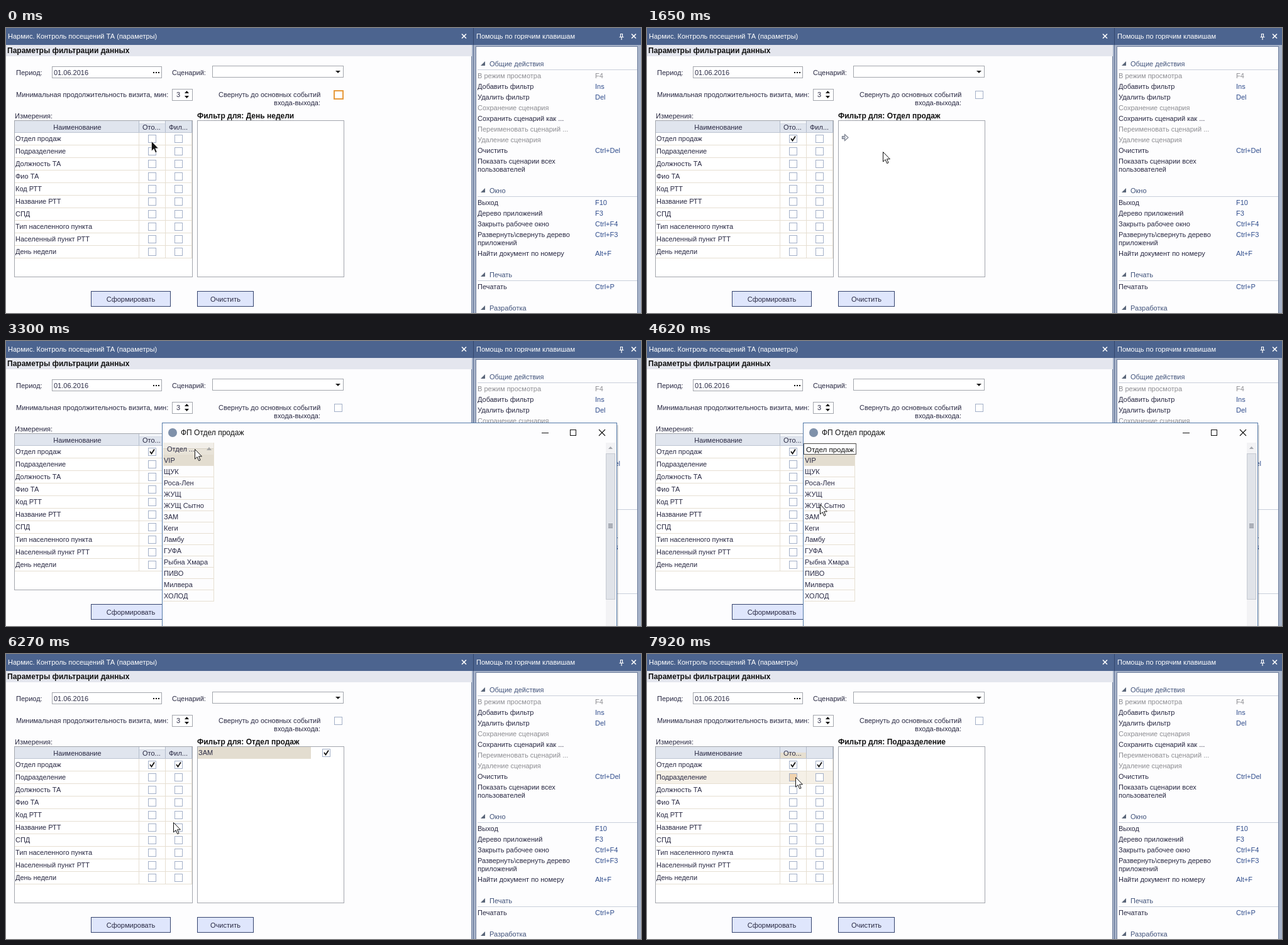
Recreate the animation shown at these times as an HTML page. Size 1010 by 454 pixels, loop 8 s.

```html
<!DOCTYPE html>
<html lang="ru">
<head>
<meta charset="utf-8">
<style>
html, body { margin: 0; width: 100%; height: 100%; overflow: hidden; background: #fdfdfe; }
svg { display: block; width: 100vw; height: 100vh; font: 11px "Liberation Sans", Arial, sans-serif; }
rect { shape-rendering: crispEdges; }
text { white-space: pre; }
</style>
</head>
<body>
<svg id="stage" viewBox="0 0 1010 454"></svg>
<script>
const LOOP = 8000, STEP = 330;
const INK = '#292943', BLUE = '#2f4c8c', DIM = '#8d8d92', BAR = '#4c648f';
const TAN = '#e3ddd0', GRID = '#e6dfd2', EDGE = '#a3a6ad', BOX = '#a3b0c8';

const rows = ['Отдел продаж', 'Подразделение', 'Должность ТА', 'Фио ТА', 'Код РТТ', 'Название РТТ',
  'СПД', 'Тип населенного пункта', 'Населенный пункт РТТ', 'День недели'];
const depts = ['VIP', 'ЩУК', 'Роса-Лен', 'ЖУЩ', 'ЖУЩ Сытно', 'ЗАМ', 'Кеги', 'Ламбу', 'ГУФА',
  'Рыбна Хмара', 'ПИВО', 'Милвера', 'ХОЛОД'];
// baseline, label, key, disabled
const help = [
  [80, 'В режим просмотра', 'F4', 1], [97, 'Добавить фильтр', 'Ins'], [114, 'Удалить фильтр', 'Del'],
  [131, 'Сохранение сценария', '', 1], [148, 'Сохранить сценарий как ...', ''],
  [165, 'Переименовать сценарий ...', '', 1], [182, 'Удаление сценария', '', 1],
  [199, 'Очистить', 'Ctrl+Del'], [216, 'Показать сценарии всех', ''], [229, 'пользователей', ''],
  [282, 'Выход', 'F10'], [299, 'Дерево приложений', 'F3'], [316, 'Закрыть рабочее окно', 'Ctrl+F4'],
  [333, 'Развернуть\\свернуть дерево', 'Ctrl+F3'], [346, 'приложений', ''],
  [363, 'Найти документ по номеру', 'Alt+F'], [416, 'Печатать', 'Ctrl+P']];
const groups = [[61, 'Общие действия'], [263, 'Окно'], [397, 'Печать'], [450, 'Разработка']];

// first step, x, y of the pointer
const moves = [[0, 231, 180], [1, 240, 191], [3, 324, 215], [4, 371, 228], [5, 375, 197],
  [9, 330, 180], [10, 300, 172], [11, 286, 174], [12, 280, 234], [13, 275, 258], [14, 275, 260],
  [15, 282, 252], [16, 272, 280], [17, 271, 283], [18, 272, 281], [19, 266, 268],
  [20, 246, 240], [21, 236, 222], [22, 236, 196]];
const clicks = [1, 4, 18];

const rect = (x, y, w, h, fill) => `<rect x="${x}" y="${y}" width="${w}" height="${h}" fill="${fill}"/>`;
const frame = (x, y, w, h, edge, fill = '#fff') => rect(x, y, w, h, edge) + rect(x + 1, y + 1, w - 2, h - 2, fill);
const text = (x, y, s, fill = INK, more = '') => `<text x="${x}" y="${y}" fill="${fill}" ${more}>${s}</text>`;
const mid = (x, y, s) => text(x, y, s, INK, 'text-anchor="middle"');
const bold = (x, y, s) => text(x, y, s, '#111', 'font-size="12" font-weight="700"');
const shape = (d, fill) => `<path d="${d}" fill="${fill}"/>`;
const line = (d, color, w = 1) => `<path d="${d}" fill="none" stroke="${color}" stroke-width="${w}"/>`;
const cross = (x, y, r, color, w) => line(`M${x - r} ${y - r}l${2 * r} ${2 * r}m0 ${-2 * r}l${-2 * r} ${2 * r}`, color, w);
const check = (x, y, on, fill = '#fff') => frame(x, y, 13, 13, BOX, fill) +
  (on ? line(`M${x + 3} ${y + 6}l2.5 3.5l4.5 -7`, '#111', 1.8) : '');

function titles() {
  return rect(0, 0, 743, 27, BAR) + text(3, 17, 'Нармис. Контроль посещений ТА (параметры)', '#fff') +
    cross(728.5, 13, 3.5, '#fff', 1.6) +
    rect(0, 27, 741, 18, '#e4e6ee') + bold(2, 40, 'Параметры фильтрации данных');
}

function sidebar() {
  let s = rect(740, 27, 270, 427, '#a7b3c9') + rect(740, 27, 1, 427, '#74839f') +
    rect(743, 0, 1, 454, '#5b6d90') + rect(744, 0, 266, 27, BAR) + rect(742, 0, 2, 27, '#33466c') +
    frame(747, 29, 258, 430, '#6b7b9a', '#fdfdfe') +
    text(748, 17, 'Помощь по горячим клавишам', '#fff') + cross(998.5, 13, 3.5, '#fff', 1.6) +
    line('M977.5 9v5M980.5 9v5M977 9.5h4M975.5 14.5h7M979 15v4', '#fff', 1.2);
  for (const [y, name] of groups)
    s += shape(`M755 ${y - 1}h7v-7z`, '#5a6679') + text(769, y, name, '#40527a') +
      rect(750, y + 5, 254, 1, '#c9cfdb');
  for (const [y, name, key, off] of help)
    s += text(750, y, name, off ? DIM : INK) + text(937, y, key, off ? DIM : BLUE);
  return s;
}

function fields(k) {
  return text(16, 75, 'Период:') + frame(73, 61, 175, 19, EDGE) + text(76, 75, '01.06.2016') +
    [234, 238, 242].map(x => rect(x, 70, 2, 2, '#111')).join('') +
    text(264, 75, 'Сценарий:') + frame(328, 60, 209, 19, EDGE) + shape('M524 68h8l-4 4z', '#222') +
    text(16, 110, 'Минимальная продолжительность визита, мин:') + frame(264, 97, 33, 19, EDGE) +
    text(271, 110, '3') + shape('M284 104h7l-3.5 -4zM284 108h7l-3.5 4z', '#111') +
    text(338, 110, 'Свернуть до основных событий') +
    text(500, 123, 'входа-выхода:', INK, 'text-anchor="end"') +
    (k < 2 ? rect(521, 99, 16, 15, '#e79a3c') + rect(523, 101, 12, 11, '#fff') : check(522, 100)) +
    text(14, 144, 'Измерения:');
}

function table(k) {
  const last = k > 23;
  let s = frame(13, 147, 284, 250, EDGE) + rect(14, 148, 282, 18, '#e0e5ee') + rect(14, 166, 282, 1, '#bcc4d2');
  s += last ? rect(212, 157, 41, 9, '#e6dfd0') : rect(212, 148, 41, 4, '#f3f5f9') + rect(212, 152, 41, 1, '#d3d8e2');
  s += mid(113.5, 162, 'Наименование') + text(217, 162, 'Ото...') + (last ? '' : text(259, 162, 'Фил...'));
  if (last) s += rect(14, 187, 281, 19, '#f5f0e7');
  rows.forEach((name, i) => {
    const y = 167 + i * 20;
    s += rect(14, y + 19, 282, 1, GRID) + text(15, y + 13, name) +
      check(226, y + 3, !i && k > 1, last && i == 1 ? '#f0d3ae' : '#fff') +
      check(268, y + 3, !i && k > 18);
  });
  for (const x of [211, 253, 295]) s += rect(x, 148, 1, 18, '#b4bdcc') + rect(x, 167, 1, 200, GRID);
  return s;
}

function filter(k) {
  const name = rows[k < 2 ? 9 : k < 24 ? 0 : 1];
  let s = bold(304, 144, 'Фильтр для: ' + name) + frame(304, 147, 234, 250, EDGE);
  if (k >= 5 && k < 19) s += line('M310.5 172.5h4v-3l5.5 5l-5.5 5v-3h-4z', '#777d8b', 1.2) + rect(311, 173, 5, 3, '#b5bac6');
  if (k > 18 && k < 24) s += rect(305, 148, 180, 19, TAN) + text(306, 161, 'ЗАМ') + check(503, 151, 1);
  return s;
}

function buttons() {
  return frame(135, 419, 127, 25, '#35446f', '#dfe6fc') + mid(198.5, 436, 'Сформировать') +
    frame(304, 419, 90, 25, '#35446f', '#dfe6fc') + mid(349, 436, 'Очистить');
}

function popup(k) {
  const picked = k > 17, thumb = picked ? 269 : 179;
  let s = rect(972, 134, 2, 320, '#0002') + frame(248, 130, 724, 330, '#5379a8', '#fdfdfe') +
    '<circle cx="265" cy="146" r="7" fill="#7f91aa"/>' +
    text(278, 150, 'ФП Отдел продаж', '#111', 'font-size="12"') +
    rect(852, 146, 11, 1, '#111') + frame(897, 141, 10, 10, '#111') + cross(948, 146, 5, '#111', 1.1);
  s += rect(250, 162, 80, 19, '#f1eee8') +
    (picked ? rect(250, 171, 80, 10, TAN) : rect(250, 171, 80, 1, '#d5cfc2') + rect(250, 172, 80, 9, '#e8e3d8')) +
    rect(330, 162, 1, 253, GRID) + text(256, 176, 'Отдел ...') + shape('M319 174h8l-4 -5z', '#a7a7a7');
  depts.forEach((name, i) => {
    const y = 181 + i * 18;
    if (i == (picked ? 5 : 0)) s += rect(250, y, 80, 17, TAN);
    s += rect(250, y + 17, 80, 1, GRID) + text(251, y + 13, name);
  });
  s += rect(954, 162, 16, 292, '#f3f3f5') + shape('M958 172h7l-3.5 -4z', '#a4a7ad') +
    frame(954, thumb, 15, 233, '#c6cad2', '#e0e3e9');
  for (let i = 0; i < 4; i++) s += rect(958, thumb + 112 + i * 2, 7, 1, '#777d88');
  if (k > 10 && k < 15)
    s += frame(249, 163, 84, 18, '#555') + text(253, 177, 'Отдел продаж', '#111', 'font-size="11.5"');
  return s;
}

function pointer(k) {
  const [, x, y] = moves.findLast(m => m[0] <= k);
  const ring = clicks.includes(k) ? `<circle cx="${x - 1}" cy="${y}" r="29" fill="none" stroke="#111" stroke-width="2.6"/>` : '';
  return ring + `<path transform="translate(${x} ${y})" d="M.5 .5v15.5l3.6 -3.4l2.6 6l2.4 -1l-2.6 -5.8h4.9z"
    fill="${k ? '#fff' : '#111'}" stroke="${k ? '#111' : '#fff'}" stroke-width="${k ? 1 : .6}"/>`;
}

const stage = document.getElementById('stage');
let shown = -1;

function draw(now) {
  const k = Math.floor(now % LOOP / STEP);
  if (k != shown) {
    shown = k;
    stage.innerHTML = rect(0, 0, 1010, 454, '#fdfdfe') + sidebar() + titles() + fields(k) + table(k) +
      filter(k) + buttons() + (k > 5 && k < 19 ? popup(k) : '') + pointer(k);
  }
  requestAnimationFrame(draw);
}
draw(performance.now());
</script>
</body>
</html>
```
